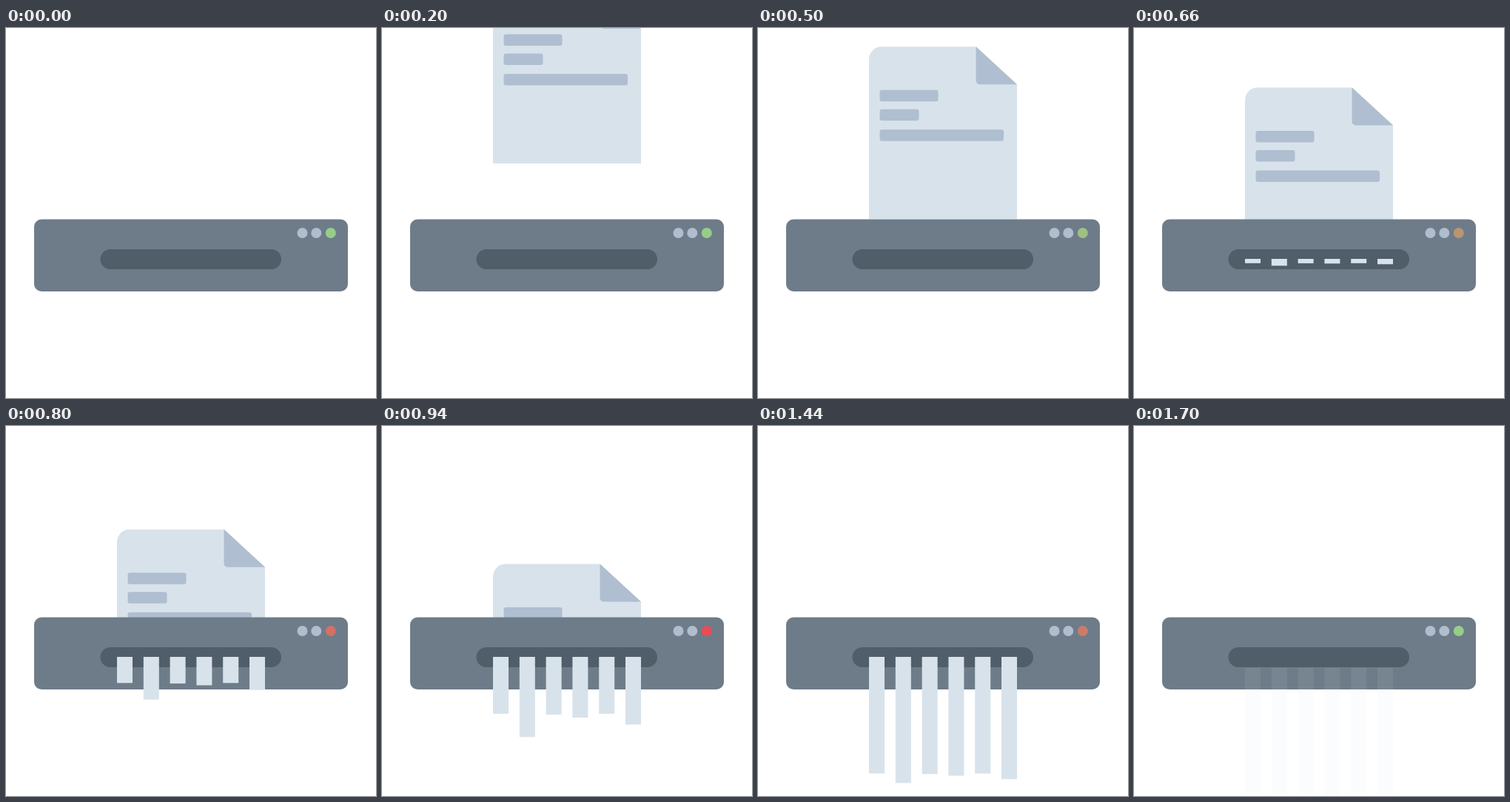
Recreate the animation shown at these times as an HTML page. Size 500 by 500 pixels, loop 1.78 s.

```html
<!DOCTYPE html>
<html lang="en">
<head>
<meta charset="utf-8">
<title>Paper shredder</title>
<style>
  html, body { margin: 0; width: 100%; height: 100%; overflow: hidden; background: #fff; }
  svg { display: block; width: 100vw; height: 100vh; }
</style>
</head>
<body>
<svg viewBox="0 0 500 500">
  <clipPath id="above"><rect width="500" height="290"/></clipPath>
  <g clip-path="url(#above)">
    <g id="paper">
      <path fill="#d8e2ea" d="M150 17a17 17 0 0 1 17-17H295L350 51V233H150Z"/>
      <path fill="#afbed0" d="M294.500 0L350 51H299.500a5 5 0 0 1-5-5Z"/>
      <g fill="#afbed0">
        <rect x="164.500" y="58.500" width="79" height="15.500" rx="3"/>
        <rect x="164.500" y="84.500" width="53" height="15.500" rx="3"/>
        <rect x="164.500" y="112" width="167.500" height="15.500" rx="3"/>
      </g>
    </g>
  </g>
  <rect x="38" y="258.500" width="424" height="97.500" rx="10" fill="#6d7c88"/>
  <rect x="127.500" y="299" width="244.500" height="27" rx="13.500" fill="#505e69"/>
  <circle cx="400.500" cy="277" r="7" fill="#afbdcf"/>
  <circle cx="419.300" cy="277" r="7" fill="#afbdcf"/>
  <circle id="led" cx="438.800" cy="277" r="7"/>
  <g id="strips" fill="#d8e2ea"></g>
</svg>
<script>
const LOOP = 1780, STEP = 20, LAST = 1700;
const GREEN = [150, 206, 137], RED = [255, 42, 73];
const DURATIONS = [1290, 945, 1275, 1225, 1290, 1115];

const $ = id => document.getElementById(id);
const paper = $('paper'), led = $('led'), group = $('strips');

const strips = DURATIONS.map((_, i) => {
  const r = document.createElementNS('http://www.w3.org/2000/svg', 'rect');
  r.setAttribute('x', 150 + i * 35.8);
  r.setAttribute('y', 312);
  r.setAttribute('width', 21);
  group.append(r);
  return r;
});

const span = (t, start, length) => Math.min(1, Math.max(0, (t - start) / length));

// cubic-bezier(.25, .1, .25, 1), solved by bisection
const bez = (s, a, b) => 3 * s * (1 - s) ** 2 * a + 3 * s * s * (1 - s) * b + s ** 3;
function ease(u) {
  let lo = 0, hi = 1;
  for (let i = 0; i < 24; i++) {
    const mid = (lo + hi) / 2;
    if (bez(mid, .25, .25) < u) lo = mid; else hi = mid;
  }
  return bez(lo, .1, 1);
}

function draw(t) {
  const drop = 1 - (1 - span(t, 100, 300)) ** 3.5;
  const y = -241 + 252 * drop + 262 * ease(span(t, 404, 1370));
  paper.setAttribute('transform', `translate(0 ${y})`);

  strips.forEach((r, i) =>
    r.setAttribute('height', 171.5 * ease(span(t, 594, DURATIONS[i]))));
  const out = span(t, 1460, 264);
  group.setAttribute('transform', `translate(0 ${18 * out * out})`);
  group.setAttribute('opacity', t < 594 ? 0 : 1 - out);

  const heat = span(t, 445, 623) - span(t, 1187, 504);
  led.setAttribute('fill', `rgb(${GREEN.map((g, i) => Math.round(g + (RED[i] - g) * heat))})`);
}

const begin = performance.now();
function frame() {
  const t = (performance.now() - begin) % LOOP;
  draw(Math.min(LAST, Math.floor(t / STEP) * STEP));
  requestAnimationFrame(frame);
}
frame();
</script>
</body>
</html>
```
